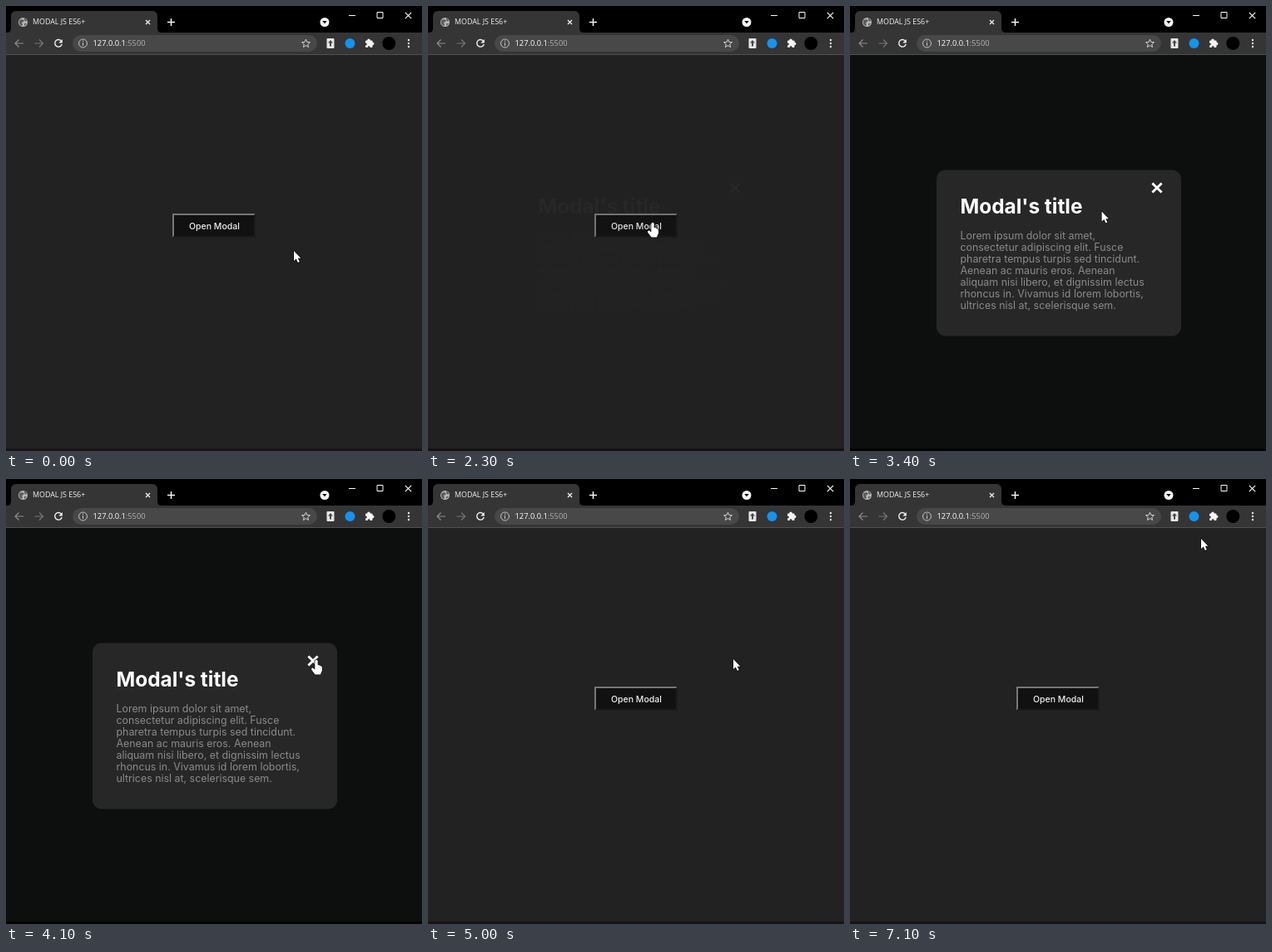
Recreate the animation shown at these times as an HTML page with a canvas. Size 500 by 536 pixels, loop 7200 ms.

```html
<!DOCTYPE html>
<html lang="en">
<head>
<meta charset="utf-8">
<title>Modal demo</title>
<style>
  html, body { margin: 0; width: 100%; height: 100%; overflow: hidden; background: #222; }
  canvas { display: block; width: 500px; height: 536px; }
</style>
</head>
<body>
<canvas id="stage"></canvas>
<script>
const W = 500, H = 536, LOOP = 7200, STEP = 100;
const UI = '"Open Sans", "Noto Sans", sans-serif';
const PAGE = 'Inter, "Open Sans", sans-serif';
const BODY = [
  'Lorem ipsum dolor sit amet,',
  'consectetur adipiscing elit. Fusce',
  'pharetra tempus turpis sed tincidunt.',
  'Aenean ac mauris eros. Aenean',
  'aliquam nisi libero, et dignissim lectus',
  'rhoncus in. Vivamus id lorem lobortis,',
  'ultrices nisl at, scelerisque sem.'
];

// Pointer keys: time, x, y of the hot spot
const ROUTE = [
  [0, 346, 295], [400, 347, 285], [500, 347, 285], [800, 300, 231],
  [1050, 229, 252], [1300, 270, 254], [1400, 270, 254], [1600, 270, 261],
  [3100, 270, 261], [3900, 373, 218], [4500, 373, 218], [4900, 367, 217],
  [5300, 367, 217], [6900, 422, 72], [7200, 422, 72]
];

const canvas = document.getElementById('stage');
const ctx = canvas.getContext('2d');
const dpr = window.devicePixelRatio || 1;
canvas.width = W * dpr;
canvas.height = H * dpr;

const clamp = v => Math.max(0, Math.min(1, v));
const smooth = v => v * v * (3 - 2 * v);
const ramp = (t, a, b) => smooth(clamp((t - a) / (b - a)));

function rect(x, y, w, h, color) {
  ctx.fillStyle = color;
  ctx.fillRect(x, y, w, h);
}

function round(x, y, w, h, r, color) {
  ctx.beginPath();
  ctx.roundRect(x, y, w, h, r);
  ctx.fillStyle = color;
  ctx.fill();
}

function disc(x, y, r, color) {
  ctx.beginPath();
  ctx.arc(x, y, r, 0, 7);
  ctx.fillStyle = color;
  ctx.fill();
}

function stroke(d, color, width = 1.2) {
  ctx.strokeStyle = color;
  ctx.lineWidth = width;
  ctx.stroke(new Path2D(d));
}

function fill(d, color) {
  ctx.fillStyle = color;
  ctx.fill(new Path2D(d));
}

function text(str, x, y, font, color) {
  ctx.font = font;
  ctx.fillStyle = color;
  ctx.fillText(str, x, y);
}

function cross(x, y, r, color, width) {
  stroke(`M${x - r} ${y - r}L${x + r} ${y + r}M${x + r} ${y - r}L${x - r} ${y + r}`, color, width);
}

function star(x, y, r) {
  let d = '';
  for (let i = 0; i < 10; i++) {
    const a = i * Math.PI / 5 - Math.PI / 2, k = i % 2 ? r * 0.45 : r;
    d += `${i ? 'L' : 'M'}${x + k * Math.cos(a)} ${y + k * Math.sin(a)}`;
  }
  stroke(d + 'Z', '#d4d4d4', 1);
}

function drawTabs() {
  rect(0, 0, W, 32, '#000');
  round(6, 6, 176, 30, 6, '#353535');
  fill('M1 32Q6 32 6 27V32Z M182 27Q182 32 187 32H182Z', '#353535');
  disc(20.5, 19.5, 5.5, '#b4b4b4');
  fill('M16 17L20 16L22 18L19 20L20 23L18 24L16 21Z M22 14L25 17L24 19L22 17Z M22 21L25 21L22 24Z', '#5c5c5c');
  text('MODAL JS ES6+', 32, 22.3, `8.9px ${UI}`, '#f2f2f2');
  cross(170.5, 19.5, 2.5, '#e8e8e8', 1.4);
  stroke('M194 19.5H203M198.5 15V24', '#f4f4f4', 1.5);
  disc(383, 19.5, 5.5, '#f4f4f4');
  fill('M380.3 18H385.7L383 21.3Z', '#000');
  stroke('M412 11.5H420', '#fff', 1);
  stroke('M446 7.5H453V14.5H446Z', '#fff', 1);
  cross(483.5, 11.5, 3.7, '#fff', 1.1);
}

function drawToolbar() {
  rect(0, 32, W, 26, '#353535');
  rect(0, 58, W, 1, '#505050');
  stroke('M21 45H11M15.5 40.5L11 45L15.5 49.5', '#8e8e8e');
  stroke('M34.5 45H44.5M40 40.5L44.5 45L40 49.5', '#777');
  stroke('M66.3 42A4.3 4.3 0 1 0 67.2 46', '#f0f0f0', 1.4);
  fill('M67.8 40V44.5H63.3Z', '#f0f0f0');

  round(80, 35, 294, 20, 10, '#484848');
  stroke('M97.5 45A5 5 0 1 1 87.5 45A5 5 0 1 1 97.5 45M92.5 44V48M92.5 41.8V43', '#c4c4c4', 1);
  const font = `9.3px ${UI}`;
  text('127.0.0.1', 104.5, 48.3, font, '#fff');
  text(':5500', 104.5 + ctx.measureText('127.0.0.1').width, 48.3, font, '#b2b2b2');
  star(360.5, 45.3, 5.2);

  round(385.5, 39, 9, 12, 1, '#e6e6e6');
  fill('M390 41L393 44.5H391V48.5H389V44.5H387Z', '#464a50');
  disc(413.5, 45, 6, '#1593ee');
  round(432, 41.5, 8.5, 8.5, 1, '#f4f4f4');
  disc(436, 41.3, 1.8, '#f4f4f4');
  disc(440.6, 45.4, 1.8, '#f4f4f4');
  disc(432.4, 46, 1.4, '#353535');
  disc(436.2, 49.6, 1.4, '#353535');
  disc(460.3, 45, 8, '#000');
  for (const y of [41, 45, 49]) disc(484, y, 1.2, '#e6e6e6');
}

function drawPage() {
  rect(0, 59, W, H - 59, '#222');
  rect(0, 533, W, 3, '#171316');
  rect(200, 250, 100, 29, '#111');
  fill('M200 250H300L298 252H202V277L200 279Z', '#777');
  fill('M300 250V279H200L202 277H298V252Z', '#1b1b1b');
  text('Open Modal', 220, 268.6, `500 10.5px ${PAGE}`, '#f0f0f0');
}

function drawModal(alpha) {
  if (alpha <= 0) return;
  ctx.globalAlpha = alpha;
  rect(0, 59, W, H - 59, '#0d0f0e');
  rect(0, 533, W, 3, '#040304');
  round(104, 197.5, 294, 200, 11, '#272727');
  text("Modal's title", 132.5, 250, `700 24.4px ${PAGE}`, '#fff');
  BODY.forEach((line, i) => text(line, 132.5, 280.6 + i * 14, `12.4px ${PAGE}`, '#8a8a8a'));
  cross(369, 219, 5.6, '#fff', 2.8);
  ctx.globalAlpha = 1;
}

function pointerAt(t) {
  const i = ROUTE.findIndex((k, n) => n > 0 && t <= k[0]);
  const [t0, x0, y0] = ROUTE[Math.max(0, i - 1)];
  const [t1, x1, y1] = ROUTE[Math.max(1, i)];
  const k = ramp(t, t0, t1);
  return [x0 + (x1 - x0) * k, y0 + (y1 - y0) * k];
}

function drawPointer(t) {
  const [x, y] = pointerAt(t);
  const onButton = t < 3150 && x > 200 && x < 300 && y > 250 && y < 279;
  const onClose = t > 3150 && t < 4800 && Math.abs(x - 369) < 9 && Math.abs(y - 219) < 9;
  const shape = onButton || onClose
    ? 'M-1.7 1Q0 -1.5 1.7 1V6L3.5 6.3L5.5 7.2Q7 7.8 7 9.5V12.5L5 17.5H-1.5L-6 11.5Q-6 9 -4 9.5L-1.7 11.5Z'
    : 'M0 0V12L2.8 9.5L4.8 14L6.8 13.1L4.9 8.8H8.4Z';
  ctx.save();
  ctx.translate(x, y);
  ctx.lineJoin = 'round';
  stroke(shape, '#0a0a0a', 1.4);
  fill(shape, '#fff');
  ctx.restore();
}

function frame(now) {
  const t = Math.floor(now % LOOP / STEP) * STEP;
  ctx.setTransform(dpr, 0, 0, dpr, 0, 0);
  drawPage();
  drawModal(ramp(t, 2250, 2750) - ramp(t, 4450, 4950));
  drawTabs();
  drawToolbar();
  drawPointer(t);
  requestAnimationFrame(frame);
}

let start;
requestAnimationFrame(function begin(now) {
  start = now;
  frame(0);
});
const loop = frame;
frame = now => loop(now - start);
</script>
</body>
</html>
```
